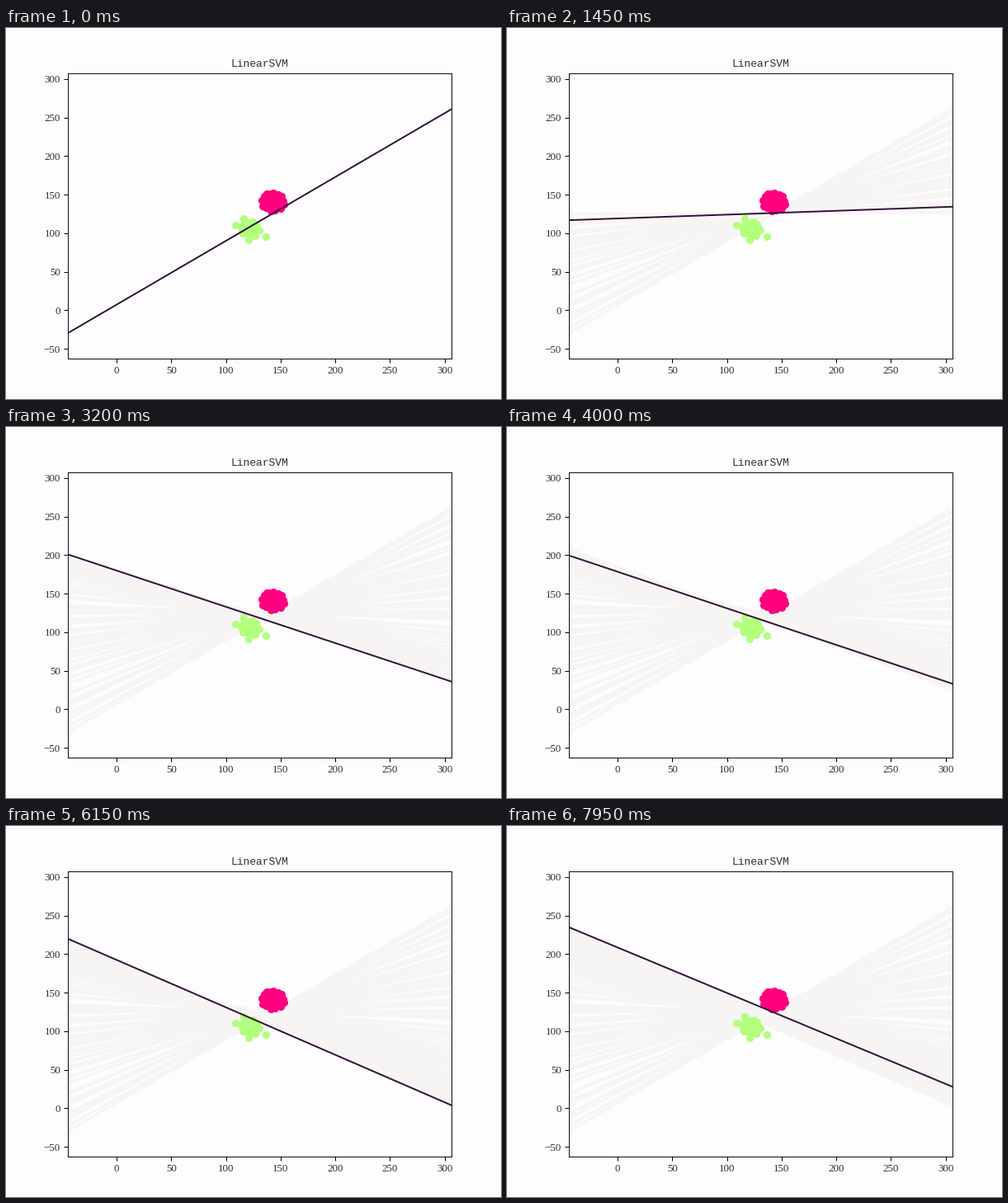
A matplotlib script for the animation above (8000 ms loop, 600x450 px).

```python
import matplotlib.pyplot as plt
import numpy as np
from matplotlib.animation import FuncAnimation
from matplotlib.collections import LineCollection

FRAMES, STEP = 160, 50
WIDTH, HEIGHT, DPI = 600, 450, 93.75
LEFT, RIGHT, TOP, BOTTOM = 75, 540, 54.7, 400.8
XLIM, YLIM = (-44.6, 306.3), (-62.4, 307.8)
PAPER, INK = "#fdfdfd", "#303034"

# time in ms, height of the boundary at the left and right edges
KEYS = np.array([(0, -29.5, 261), (700, 67, 187), (2150, 180, 69),
                 (3200, 201, 36), (4750, 206, 23), (6150, 220, 4),
                 (7950, 235, 28)])


def boundary_path():
    """Edge heights per frame: a drift through the keys with a noisy wobble."""
    t = np.arange(FRAMES) * STEP
    times = KEYS[:, 0]
    k = np.clip(np.searchsorted(times, t, side="right") - 1, 0, len(times) - 2)
    u = (t - times[k]) / (times[k + 1] - times[k])
    wobble = np.random.default_rng(4).normal(0, 4, FRAMES) * np.sin(np.pi * u)
    left = np.interp(t, times, KEYS[:, 1]) + wobble
    right = np.interp(t, times, KEYS[:, 2]) - wobble
    return left, right


def blob(cx, cy, rx, ry, n):
    """Points spread evenly over an ellipse, in stage pixels."""
    i = np.arange(n)
    r, a = np.sqrt(i / (n - 1)), i * np.pi * (3 - np.sqrt(5))
    return np.column_stack([cx + rx * r * np.cos(a), cy + ry * r * np.sin(a)])


def dots(points, color):
    px, py = np.array(points).T
    x = np.interp(px, (LEFT, RIGHT), XLIM)
    y = np.interp(py, (TOP, BOTTOM), YLIM[::-1])
    ax.scatter(x, y, s=36, color=color, zorder=1)


plt.rcParams["font.family"] = "Liberation Serif"
fig, ax = plt.subplots(figsize=(WIDTH / DPI, HEIGHT / DPI), dpi=DPI,
                       facecolor=PAPER)
fig.subplots_adjust(left=LEFT / WIDTH, right=RIGHT / WIDTH,
                    bottom=1 - BOTTOM / HEIGHT, top=1 - TOP / HEIGHT)
ax.set(xlim=XLIM, ylim=YLIM, facecolor=PAPER,
       xticks=range(0, 301, 50), yticks=range(-50, 301, 50))
ax.tick_params(labelcolor=INK, labelsize=10)
ax.set_title("LinearSVM", family="Liberation Mono", size=10, color=INK)
for spine in ax.spines.values():
    spine.set_color("#101028")

left, right = boundary_path()
segments = [[(XLIM[0], a), (XLIM[1], b)] for a, b in zip(left, right)]

trail = ax.add_collection(
    LineCollection([], colors="#f7f5f4", linewidths=2.6, zorder=0.5),
    autolim=False)
stragglers = [(278, 239), (288, 231), (294, 257), (314.5, 253)]
dots(np.vstack([blob(296, 243.5, 12, 9.5, 26), stragglers]), "#b2ff7c")
dots(blob(323.5, 210.5, 14.5, 12, 44), "#ff0080")
line, = ax.plot([], [], color="#32123a", lw=1.5, zorder=2)


def draw(i):
    trail.set_segments(segments[:i])
    line.set_data(XLIM, (left[i], right[i]))
    return trail, line


anim = FuncAnimation(fig, draw, frames=FRAMES, interval=STEP,
                     repeat=True, repeat_delay=0, blit=False)
plt.show()
```
